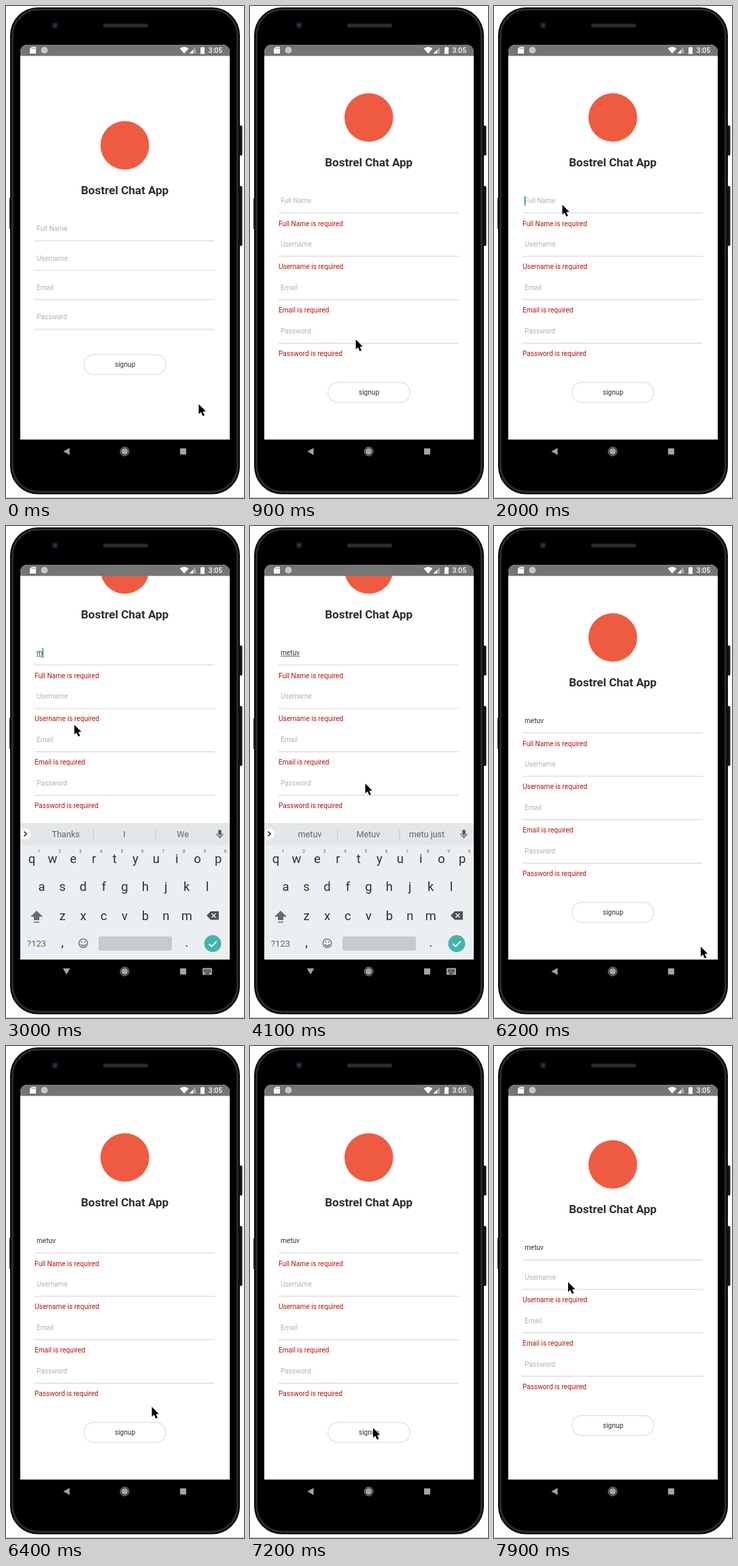
Write an HTML page that moves like this. It is 350 px wide and 724 px high and loops after 8 s.

```html
<!DOCTYPE html>
<html lang="en">
<head>
<meta charset="utf-8">
<title>Signup form</title>
<style>
  html, body { margin: 0; width: 100%; height: 100%; overflow: hidden; background: #fff; }
  svg { display: block; width: 350px; height: 724px; }
  text { font-family: Roboto, "Liberation Sans", sans-serif; }
  .mid { text-anchor: middle; }
  .title { font-size: 17px; font-weight: 700; fill: #2e2e2e; }
  .small { font-size: 10.1px; }
  .hint { fill: #b2b2b2; }
  .typed, .label { fill: #333; }
  .error { fill: #bf110b; }
  .rule { stroke: #dedede; stroke-width: 1.4; }
  .word { font-size: 12.6px; fill: #5c656a; }
  .key { font-size: 18.4px; fill: #263238; }
  .digit { font-size: 7px; fill: #666f74; }
</style>
</head>
<body>
<svg viewBox="0 0 350 724">
  <defs>
    <clipPath id="screen"><path d="M21 638V69Q21 57 33 57H317Q329 57 329 69V638Z"/></clipPath>
  </defs>

  <g id="phone">
    <path d="M0 723.5H350" stroke="#c4c4c4"/>
    <path d="M343 176h3q1.500 0 1.500 2v40q0 2-1.500 2h-3zM343 265h3q1.500 0 1.500 2v84q0 2-1.500 2h-3z" fill="#151617"/>
    <path d="M5.500 283V328" stroke="#333"/>
    <rect x="6" y="2" width="338" height="716.500" rx="41" fill="#0c0d0d"/>
    <rect x="9.500" y="5" width="331" height="710" rx="38" fill="none" stroke="#303335" stroke-width="2"/>
    <rect x="12" y="7.500" width="326" height="705" rx="36" fill="#000"/>
    <rect x="143" y="26" width="66" height="5.500" rx="2.700" fill="#2b2b2b"/>
    <circle cx="72" cy="28.500" r="5" fill="#15191f"/>
    <circle cx="72" cy="28.500" r="2.500" fill="#21364d"/>
  </g>

  <g clip-path="url(#screen)">
    <rect x="21" y="57" width="308" height="581" fill="#fff"/>
    <g id="form">
      <circle id="logo" cx="174.700" r="35.800" fill="#ef5b40"/>
      <text id="title" class="title mid" x="174.700">Bostrel Chat App</text>
      <g id="fields"></g>
      <g id="button">
        <rect x="114.700" y="-14.600" width="120.600" height="29.200" rx="14.600" fill="#fff" stroke="#e3e3e3" stroke-width="1.400"/>
        <text class="small label mid" x="175" y="3.500">signup</text>
      </g>
    </g>

    <g id="keyboard">
      <rect x="21" y="437" width="308" height="202" fill="#eceff1"/>
      <rect x="21" y="437" width="308" height="32" fill="#e4e7e9"/>
      <circle cx="28" cy="453" r="8" fill="#fff"/>
      <path d="M26.500 449.500l3.500 3.500-3.500 3.500" fill="none" stroke="#222" stroke-width="1.600"/>
      <path d="M128.500 445V462M220 445V462" stroke="#c6cbce"/>
      <g fill="none" stroke="#5c656a" stroke-width="1.300">
        <rect x="312.600" y="447.500" width="3.800" height="7" rx="1.900" fill="#5c656a"/>
        <path d="M310 452.500a4.500 4.500 0 0 0 9 0M314.500 457V460"/>
      </g>
      <g id="keys"></g>
      <path d="M45 566l9 9h-5v5h-8v-5h-5zM41 582.300h8v1.500h-8z" fill="#626d73"/>
      <path d="M301 567h12v12.500h-12l-6-6.250z" fill="#48545a"/>
      <path d="M302.500 570.200l6 6m0-6l-6 6" stroke="#eceff1" stroke-width="1.500"/>
      <text class="mid" x="45" y="619" font-size="12.900" fill="#59646a">?123</text>
      <text class="key mid" x="83" y="619">,</text>
      <text class="key mid" x="266" y="619">.</text>
      <g fill="none" stroke="#59646a" stroke-width="1.300">
        <circle cx="113.500" cy="614" r="6.300"/>
        <path d="M110 615.500q3.500 4.500 7 0M111.200 611v2M115.800 611v2"/>
      </g>
      <rect x="136" y="604" width="108" height="21" rx="3" fill="#c6cbce"/>
      <circle cx="304" cy="614.500" r="12.500" fill="#45b5ab"/>
      <path d="M298.500 615l3.800 3.800 7.400-7.600" fill="none" stroke="#fff" stroke-width="1.800"/>
    </g>

    <rect x="21" y="57" width="308" height="16.500" fill="#757575"/>
    <g fill="#fff">
      <path d="M38 60h6v10h-9v-7z"/>
      <path d="M38.500 61v2.500M40.500 61v2.500M42.500 61v2.500" stroke="#757575" stroke-width=".8"/>
      <circle cx="56.500" cy="65" r="5" fill="#c6c6c6"/>
      <path d="M255.500 62.500q6.500-4.500 13 0l-6.500 7.500z"/>
      <path d="M279 60.500v9.500h-9.500z" fill="#a9a9a9"/>
      <path d="M275 64.500v5.500h-5.500z"/>
      <path d="M288 60h2v1h2v9.500h-6v-9.500h2z"/>
      <text x="297.500" y="69" font-size="10.500" font-weight="500">3:05</text>
    </g>
  </g>

  <g id="nav" fill="#a3a3a3">
    <path id="back" d="M84.500 655.500l9-5.300v10.600z"/>
    <circle cx="174.500" cy="655.500" r="4.900"/>
    <circle cx="174.500" cy="655.500" r="6.400" fill="none" stroke="#a3a3a3" stroke-width="1"/>
    <rect x="256" y="651" width="9" height="9"/>
    <g id="switcher">
      <rect x="289" y="650.500" width="14" height="10" rx="1"/>
      <path d="M291 653.500h10M291 656h10" stroke="#000" stroke-width="1.300" stroke-dasharray="1.400 .75"/>
      <path d="M293 658.700h6" stroke="#000"/>
    </g>
  </g>

  <path id="cursor" d="M0 0V14.500L3.300 11.500 5.800 17.300 8.400 16.200 5.900 10.500H10.400Z" stroke="#fff" stroke-width="1.100" paint-order="stroke"/>
</svg>

<script>
const LOOP = 8000, FRAME = 100;
const NAME = "metuv";
const LABELS = ["Full Name", "Username", "Email", "Password"];
const ROW = 43.4, ERROR = 20.5;
const KEYS_OPEN = 2600, KEYS_CLOSE = 6200;
const TYPED = [2900, 3100, 3300, 3400, 3600];

// time, x, y of the pointer tip
const POINTER = [
  [0, 283.5, 586], [100, 178, 526], [200, 178, 526], [500, 164.5, 523.5],
  [800, 164.5, 523.5], [1500, 102, 294], [1600, 102, 293], [1700, 100.5, 292.5],
  [3700, 100.5, 292.5], [4100, 169.5, 379], [4500, 236, 480], [5200, 303, 565],
  [5400, 346, 604], [5600, 346, 604], [6000, 304, 619], [6200, 304, 619],
  [6400, 214.5, 531], [6700, 181, 562], [7300, 181, 562], [7900, 109, 347.5]
];

const $ = id => document.getElementById(id);

function add(parent, tag, attrs, text = "") {
  const el = document.createElementNS("http://www.w3.org/2000/svg", tag);
  for (const k in attrs) el.setAttribute(k, attrs[k]);
  el.textContent = text;
  return parent.appendChild(el);
}

const show = (el, on) => el.setAttribute("visibility", on ? "inherit" : "hidden");
const move = (el, x, y) => el.setAttribute("transform", `translate(${x} ${y})`);

// Each field is drawn around its rule at y = 0.
const fields = LABELS.map(label => {
  const g = add($("fields"), "g", {});
  const hint = add(g, "text", { class: "small hint", x: 45, y: -14.4 }, label);
  add(g, "line", { class: "rule", x1: 42, x2: 307 });
  const error = add(g, "text", { class: "small error", x: 42, y: 19 }, label + " is required");
  return { g, hint, error };
});
const first = fields[0];
const typed = add(first.g, "text", { class: "small typed", x: 45, y: -14.4 });
const underline = add(first.g, "rect", { x: 45, y: -13.4, height: 0.9, fill: "#555" });
const caret = add(first.g, "rect", { y: -25, width: 1.6, height: 14.5, fill: "#2a9d8f" });

const words = [88, 174, 260].map(x => add($("keyboard"), "text", { class: "word mid", x, y: 457.7 }));

[["qwertyuiop", 38, 495.5], ["asdfghjkl", 52.5, 537], ["zxcvbnm", 83, 579.5]].forEach(([row, x0, y], r) =>
  [...row].forEach((ch, i) => {
    const x = x0 + 30.45 * i;
    add($("keys"), "text", { class: "key mid", x, y }, ch);
    if (r === 0) add($("keys"), "text", { class: "digit mid", x: x + 10.5, y: 481 }, (i + 1) % 10);
  }));

function pointerAt(t) {
  const i = POINTER.findIndex(p => p[0] > t);
  if (i < 0) return POINTER[POINTER.length - 1].slice(1);
  const [t0, x0, y0] = POINTER[i - 1], [t1, x1, y1] = POINTER[i];
  const k = (t - t0) / (t1 - t0);
  return [x0 + (x1 - x0) * k, y0 + (y1 - y0) * k];
}

function caretOn(t) {
  if (t < 1900 || t >= KEYS_CLOSE) return false;
  const start = [1900, ...TYPED].filter(s => s <= t).pop();
  return (t - start) % 1000 < 500;
}

function suggestions(t, text) {
  if (t < TYPED[1]) return ["Thanks", "I", "We"];
  const cap = text[0].toUpperCase() + text.slice(1);
  return [text, cap, text.slice(0, 4) + " just"];
}

function drawForm(t, keys) {
  const missing = i => t >= 800 && (i > 0 || t < 7300);
  const count = LABELS.filter((_, i) => missing(i)).length;
  const top = -ERROR / 2 * count - (keys ? 100 : 0);
  move($("form"), 0, top);

  let y = 345.5;
  fields.forEach((f, i) => {
    move(f.g, 0, y);
    show(f.error, missing(i));
    y += ROW + (missing(i) ? ERROR : 0);
  });
  move($("button"), 0, y + 8.5);
}

function drawTyping(t, keys) {
  const text = NAME.slice(0, TYPED.filter(s => s <= t).length);
  typed.textContent = text;
  const width = text ? typed.getComputedTextLength() : 0;
  show(first.hint, !text);
  underline.setAttribute("width", width);
  show(underline, keys);
  caret.setAttribute("x", 44.6 + width);
  show(caret, caretOn(t));
  suggestions(t, text).forEach((w, i) => words[i].textContent = w);
}

function draw(t) {
  const keys = t >= KEYS_OPEN && t < KEYS_CLOSE;
  drawForm(t, keys);
  drawTyping(t, keys);
  show($("keyboard"), keys);
  move($("keyboard"), 0, t < KEYS_OPEN + FRAME ? 30 : 0);

  const navOpen = t >= 2400 && t < KEYS_CLOSE;
  $("back").setAttribute("transform", navOpen ? "rotate(-90 89 655.5)" : "");
  show($("switcher"), navOpen);
  move($("cursor"), ...pointerAt(t));
}

$("logo").setAttribute("cy", 205);
$("title").setAttribute("y", 277);

const begin = performance.now();
function tick() {
  const t = (performance.now() - begin) % LOOP;
  draw(Math.floor(t / FRAME) * FRAME);
  requestAnimationFrame(tick);
}
tick();
</script>
</body>
</html>
```
